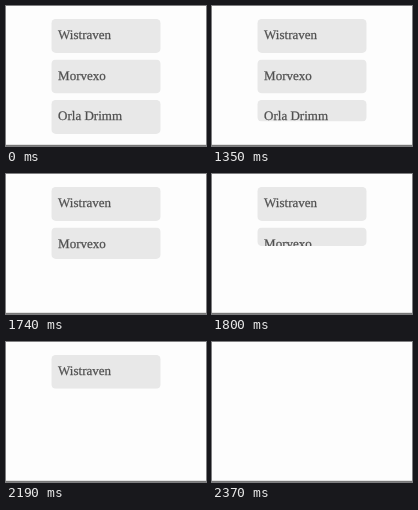
These frames come from a looping animation (200 px wide and 140 px high, 2.55 s). An HTML page:

```html
<!DOCTYPE html>
<html lang="en">
<head>
<meta charset="utf-8">
<title>List items collapsing</title>
<style>
  html, body { margin: 0; width: 100%; height: 100%; overflow: hidden; background: #fdfdfd; }
  #stage { display: block; width: 200px; height: 140px; }
  .item { overflow: hidden; }
  .item rect { fill: #e8e8e8; }
  .item text {
    font: 13px "Liberation Serif", "Times New Roman", serif;
    text-rendering: geometricPrecision;
    fill: #505050; stroke: #505050; stroke-width: 0.25px;
  }
</style>
</head>
<body>
<svg id="stage" viewBox="0 0 200 140">
  <svg class="item" x="45.3" y="12.9" width="109.4" height="34">
    <rect width="109.4" height="34" rx="4.5"/>
    <text x="6.8" y="20.2">Wistraven</text>
  </svg>
  <svg class="item" x="45.3" y="53.4" width="109.4" height="34">
    <rect width="109.4" height="34" rx="4.5"/>
    <text x="6.8" y="20.2">Morvexo</text>
  </svg>
  <svg class="item" x="45.3" y="93.9" width="109.4" height="34">
    <rect width="109.4" height="34" rx="4.5"/>
    <text x="6.8" y="20.2">Orla Drimm</text>
  </svg>
  <rect y="138.8" width="200" height="1.2" fill="#777"/>
</svg>
<script>
  const LOOP = 2550, TICK = 30, DURATION = 180;
  const PADDING = 13.5, CONTENT = 20.5;
  const starts = [2187, 1719, 1287];
  const items = [...document.querySelectorAll('.item')];

  const bezier = (a, b, u) => 3 * a * u * (1 - u) ** 2 + 3 * b * u * u * (1 - u) + u ** 3;

  // CSS "ease": cubic-bezier(.25, .1, .25, 1)
  function ease(x) {
    let lo = 0, hi = 1;
    for (let i = 0; i < 24; i++) {
      const mid = (lo + hi) / 2;
      if (bezier(0.25, 0.25, mid) < x) lo = mid; else hi = mid;
    }
    return bezier(0.1, 1, lo);
  }

  // The content height shrinks, the padding stays until the item is removed.
  function draw(now) {
    const time = Math.floor((now % LOOP) / TICK) * TICK;
    items.forEach((item, i) => {
      const p = (time - starts[i]) / DURATION;
      const height = PADDING + CONTENT * (1 - ease(Math.min(1, Math.max(0, p))));
      item.style.display = p >= 1 ? 'none' : '';
      item.setAttribute('height', height);
      item.firstElementChild.setAttribute('height', height);
    });
  }

  function loop() {
    draw(performance.now());
    requestAnimationFrame(loop);
  }
  loop();
</script>
</body>
</html>
```
